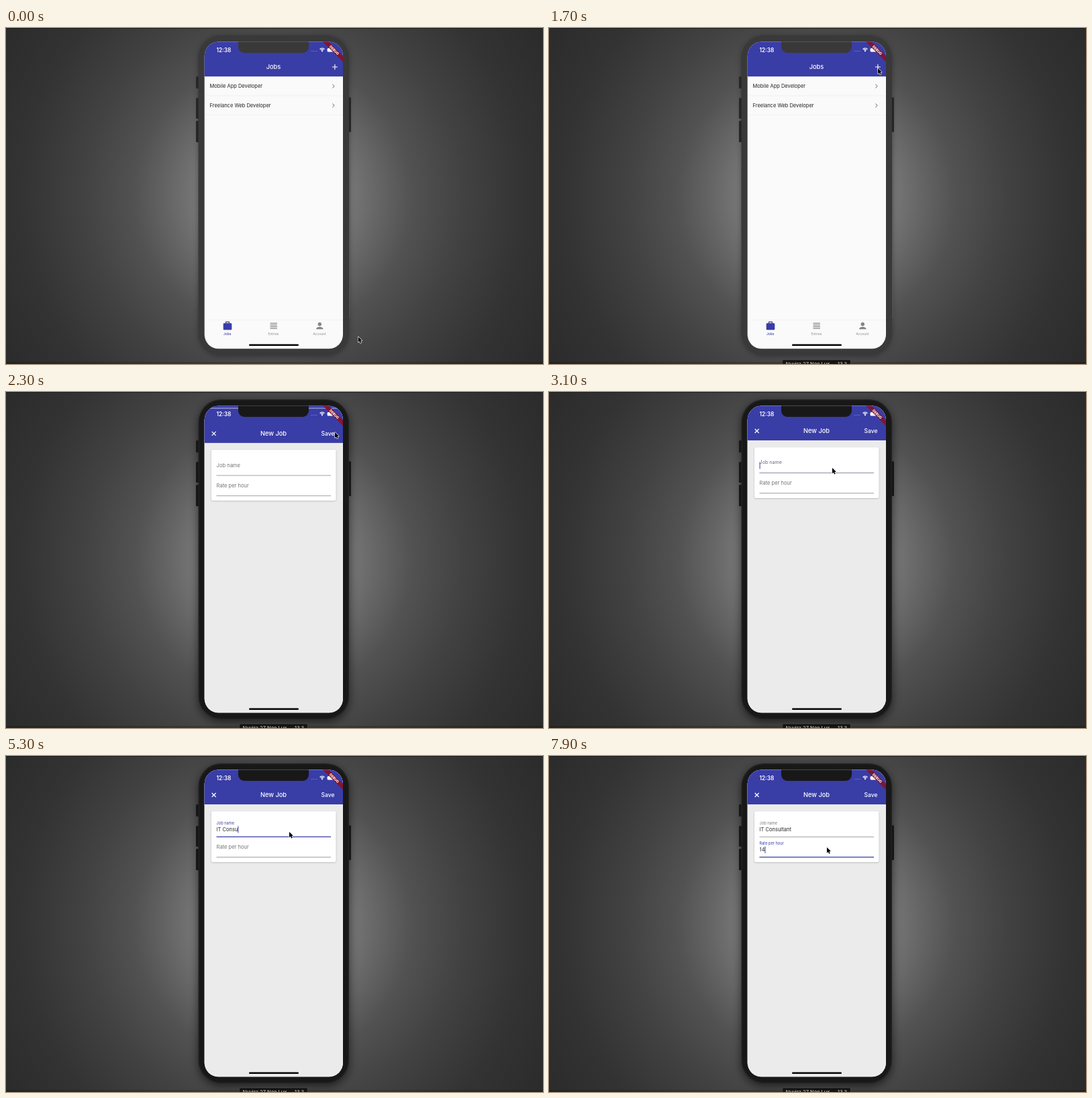
Animation of 800x500 px, one loop 8000 ms. Source, as an HTML page with a canvas:

```html
<!DOCTYPE html>
<html lang="en">
<head>
<meta charset="utf-8">
<title>New job form</title>
<style>
  html, body { margin: 0; width: 100%; height: 100%; overflow: hidden; background: #2c2c2c; }
  canvas { display: block; width: 800px; height: 500px; }
</style>
</head>
<body>
<canvas id="stage"></canvas>
<script>
const LOOP = 8000, STEP = 100;
const INDIGO = '#393da6', GREY = '#757575', INK = '#222';
const canvas = document.getElementById('stage');
const ratio = window.devicePixelRatio || 1;
canvas.width = 800 * ratio;
canvas.height = 500 * ratio;
const ctx = canvas.getContext('2d');

const clamp = v => Math.min(1, Math.max(0, v));
const progress = (t, start, length) => clamp((t - start) / length);
const mix = (a, b, p) => a + (b - a) * p;
const smooth = p => p * p * (3 - 2 * p);
const mixColor = (a, b, p) => `rgb(${a.map((v, i) => Math.round(mix(v, b[i], p)))})`;

const bezier = (a, b, s) => 3 * (1 - s) ** 2 * s * a + 3 * (1 - s) * s * s * b + s ** 3;
function linearToEaseOut(p) {
  let low = 0, high = 1;
  for (let i = 0; i < 20; i++) {
    const mid = (low + high) / 2;
    if (bezier(0.35, 0.33, mid) < p) low = mid; else high = mid;
  }
  return bezier(0.91, 0.97, low);
}

function rect(x, y, w, h, color) {
  ctx.fillStyle = color;
  ctx.fillRect(x, y, w, h);
}

function rounded(x, y, w, h, radius, color) {
  ctx.beginPath();
  ctx.roundRect(x, y, w, h, radius);
  ctx.fillStyle = color;
  ctx.fill();
}

function disc(x, y, r, color) {
  ctx.beginPath();
  ctx.arc(x, y, r, 0, 2 * Math.PI);
  ctx.fillStyle = color;
  ctx.fill();
}

function stroke(points, color, width) {
  ctx.beginPath();
  points.forEach(([x, y]) => ctx.lineTo(x, y));
  ctx.strokeStyle = color;
  ctx.lineWidth = width;
  ctx.stroke();
}

// Places text with its capitals centred on y.
function text(str, x, y, size, color, align = 'left', weight = 400) {
  ctx.font = `${weight} ${size}px Inter, sans-serif`;
  ctx.textAlign = align;
  ctx.fillStyle = color;
  ctx.fillText(str, x, y + size * 0.364);
}

function shadowed(color, blur, y, paint) {
  ctx.save();
  ctx.shadowColor = color;
  ctx.shadowBlur = blur * ratio;
  ctx.shadowOffsetY = y * ratio;
  paint();
  ctx.restore();
}

const pointerPath = [
  [0, 524.7, 459.5], [100, 519, 400], [200, 503, 190], [300, 490, 49], [400, 490, 60],
  [700, 491, 66], [1100, 500, 183], [1500, 490, 60], [2300, 490, 60],
  [2400, 476, 65], [3000, 422, 113], [6200, 422, 113], [6500, 404, 139],
  [7600, 404, 139], [7800, 414, 136]
];
function pointerAt(t) {
  const next = pointerPath.findIndex(k => k[0] > t);
  if (next < 0) return pointerPath.at(-1).slice(1);
  const [t0, x0, y0] = pointerPath[next - 1], [t1, x1, y1] = pointerPath[next];
  const p = smooth(progress(t, t0, t1 - t0));
  return [mix(x0, x1, p), mix(y0, y1, p)];
}

const jobKeys = [3700, 3900, 4200, 4500, 4700, 4800, 5000, 5300, 5600, 5700, 5800, 6000, 6100];
const rateKeys = [7400, 7700];
const typed = (str, keys, t) => str.slice(0, keys.filter(k => k <= t).length);

function drawBackdrop() {
  const glow = ctx.createRadialGradient(398, 250, 0, 398, 250, 470);
  [[0, '#888'], [0.25, '#757575'], [0.34, '#646464'], [0.44, '#525252'],
   [0.6, '#424242'], [0.8, '#333'], [1, '#2b2b2b']].forEach(s => glow.addColorStop(...s));
  rect(0, 0, 800, 500, glow);
  rect(0, 0, 800, 1, '#1d1d1d');
  rect(0, 497, 800, 3, 'rgba(0,0,0,.18)');
}

function drawBody(active) {
  const edge = active ? '#1d1d1d' : '#2b2b2b';
  [[283, 72, 18], [283, 104, 31], [283, 138, 32], [509, 103, 52]]
    .forEach(([x, y, h]) => rounded(x, y, 5, h, 1.5, edge));
  if (!active) rect(511.5, 155, 1, 277, '#666');
  shadowed(`rgba(0,0,0,${active ? 0.6 : 0.35})`, active ? 14 : 9, active ? 4 : 1, () =>
    rounded(286.5, 11, 224.5, 476, 34, active ? '#222' : '#393939'));
  if (active) rounded(288, 12.5, 221.5, 473, 33, '#181818');
}

function drawAppBar(title) {
  rect(295, 20, 208, 52, INDIGO);
  text(title, 398.5, 58, 9.3, '#fff', 'center', 500);
}

function drawTabs() {
  rect(304, 434, 198, 0.6, '#eee');
  rounded(323.7, 439.2, 12.6, 10, 1.3, INDIGO);
  ctx.strokeStyle = INDIGO;
  ctx.lineWidth = 1.2;
  ctx.strokeRect(327.6, 437.3, 4.8, 3);
  for (let i = 0; i < 4; i++) rect(393.5, 438.8 + i * 2.55, 10.4, 1.2, '#858585');
  disc(467.3, 440.7, 2.7, '#858585');
  ctx.beginPath();
  ctx.moveTo(462, 448.3);
  ctx.bezierCurveTo(462, 443.4, 472.6, 443.4, 472.6, 448.3);
  ctx.fill();
  text('Jobs', 329.7, 455, 4.8, INDIGO, 'center', 500);
  text('Entries', 398.4, 455, 4.8, '#8a8a8a', 'center');
  text('Account', 467, 455, 4.8, '#8a8a8a', 'center');
}

function drawJobs(t) {
  rect(295, 20, 208, 458, '#fafafa');
  drawAppBar('Jobs');
  rect(295, 72, 208, 1, '#dedee8');
  if (t >= 1800 && t < 2300) {
    const grow = progress(t, 1700, 300);
    disc(489, 58, mix(6, 16.5, grow), `rgba(255,255,255,${0.13 * (1 - progress(t, 2050, 300))})`);
  }
  stroke([[485.9, 58], [493.9, 58]], '#fff', 1.1);
  stroke([[489.9, 54], [489.9, 62]], '#fff', 1.1);
  ['Mobile App Developer', 'Freelance Web Developer'].forEach((job, i) => {
    const y = 86.6 + i * 28.7;
    text(job, 303.5, y, 7.5, INK);
    stroke([[486.3, y - 2.8], [489.2, y], [486.3, y + 2.8]], '#666', 1);
    rect(296, y + 14, 206, 0.6, '#ececec');
  });
  drawTabs();
}

// y is the resting centre of the label.
function drawField(label, value, y, lift, focus, caret) {
  const tint = mixColor([117, 117, 117], [57, 61, 166], focus);
  text(label, 313.6, y - 5 * lift, mix(7.55, 5.65, lift), tint);
  text(value, 313.6, y + 4.4, 7.5, INK);
  if (caret) {
    ctx.font = '400 7.5px Inter, sans-serif';
    rect(313.6 + ctx.measureText(value).width, y - 0.6, 1, 10, INDIGO);
  }
  const thickness = mix(0.7, 1.25, focus);
  rect(313.5, y + 15.3 - thickness / 2, 170.5, thickness,
    mixColor([125, 125, 125], [57, 61, 166], focus));
}

function drawForm(t, offset) {
  ctx.save();
  ctx.translate(0, offset);
  rect(295, 20, 208, 458, '#ebebeb');
  drawAppBar('New Job');
  if (offset > 0.5) rect(295, 20, 208, 0.8, '#bcbde0');
  stroke([[306.7, 55], [312.7, 61]], '#fff', 1.2);
  stroke([[312.7, 55], [306.7, 61]], '#fff', 1.2);
  text('Save', 469.5, 58, 8.6, '#fff', 'left', 500);
  shadowed('rgba(0,0,0,.3)', 2, 0.6, () => rounded(306, 82.3, 185.6, 75.6, 2, '#fff'));

  const jobLift = smooth(progress(t, 3040, 200));
  const rateLift = smooth(progress(t, 6770, 200));
  const onRate = t >= 6800;
  const jobCaret = t >= 3100 && !onRate && !(t >= 3400 && t < 3700);
  const rateCaret = onRate && !(t >= 7200 && t < 7400);
  drawField('Job name', typed('IT Consultant', jobKeys, t), 105, jobLift, jobLift * (1 - rateLift), jobCaret);
  drawField('Rate per hour', typed('14', rateKeys, t), 135.2, rateLift, rateLift, rateCaret);
  ctx.restore();
}

function drawStatus() {
  text('12:38', 313.4, 32.7, 8.3, '#fff', 'left', 600);
  for (let i = 0; i < 4; i++) disc(455.2 + i * 2.5, 34.4, 0.6, 'rgba(255,255,255,.4)');
  ctx.strokeStyle = '#fff';
  ctx.lineWidth = 1.2;
  [2.7, 4.7].forEach(r => {
    ctx.beginPath();
    ctx.arc(471, 34.7, r, -Math.PI * 0.77, -Math.PI * 0.23);
    ctx.stroke();
  });
  disc(471, 34.3, 1.1, '#fff');
  rounded(478.6, 30, 11.6, 5.4, 1.5, '#fff');
}

function drawRibbon() {
  ctx.save();
  ctx.translate(489, 33);
  ctx.rotate(Math.PI / 4);
  rect(-25, -3.1, 50, 6.2, '#7d1735');
  text('DEBUG', 0, 0, 5.1, '#fff', 'center', 800);
  ctx.restore();
}

function drawScreen(t, active) {
  ctx.save();
  ctx.beginPath();
  ctx.roundRect(295.7, 20.5, 206.3, 456.8, 21);
  ctx.clip();
  drawJobs(t);
  if (t >= 1900) drawForm(t, 456.5 * (1 - linearToEaseOut(progress(t, 1875, 500))));
  drawStatus();
  drawRibbon();
  rounded(346, 10, 105, 27, [0, 0, 9, 9], active ? '#181818' : '#393939');
  rounded(362, 470.6, 74, 2.4, 1.2, '#050505');
  ctx.restore();
}

function drawTooltip() {
  rounded(347.5, 493.5, 102, 14, 1.5, '#444');
  rounded(348.2, 494.2, 100.6, 14, 1, '#141414');
  text('Nuvira 27 Neo Lux — 13.3', 398.5, 500.2, 7.5, '#ddd', 'center');
}

function drawPointer(x, y) {
  ctx.save();
  ctx.translate(x, y);
  ctx.beginPath();
  [[0, 0], [0, 8.2], [1.9, 6.5], [3.2, 9.4], [4.6, 8.8], [3.4, 6], [5.8, 5.8]]
    .forEach(p => ctx.lineTo(...p));
  ctx.closePath();
  ctx.lineJoin = 'round';
  ctx.strokeStyle = '#eee';
  ctx.lineWidth = 1.3;
  ctx.stroke();
  ctx.fillStyle = '#000';
  ctx.fill();
  ctx.restore();
}

function draw(t) {
  const active = t >= 1800;
  ctx.setTransform(ratio, 0, 0, ratio, 0, 0);
  drawBackdrop();
  drawBody(active);
  drawScreen(t, active);
  if (t >= 300) drawTooltip();
  drawPointer(...pointerAt(t));
}

const begin = performance.now();
function tick() {
  const t = (performance.now() - begin) % LOOP;
  draw(Math.floor(t / STEP) * STEP);
  requestAnimationFrame(tick);
}
tick();
</script>
</body>
</html>
```
